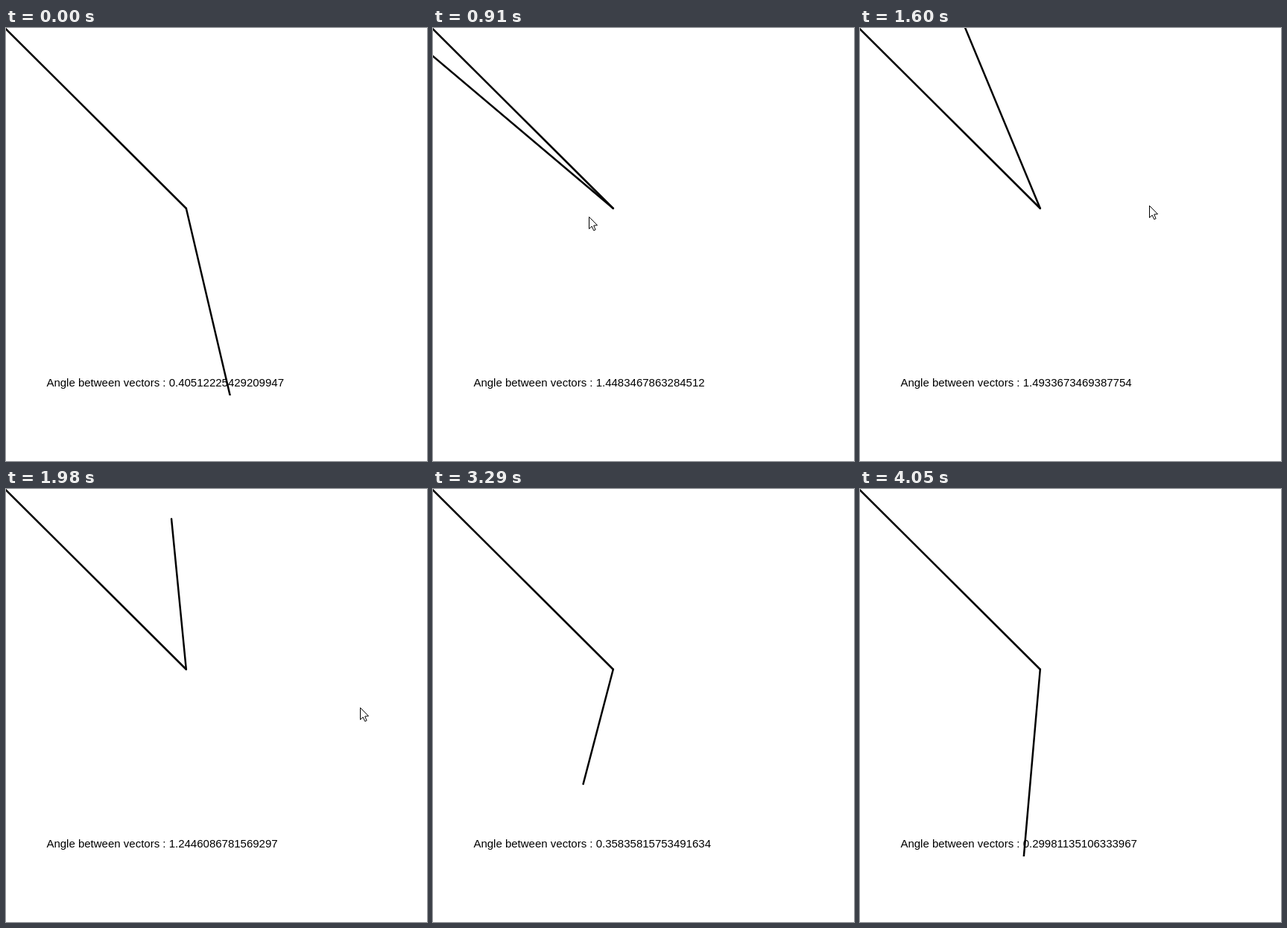
An HTML page with a canvas for the animation above (4830 ms loop, 565 by 581 pixels).

```html
<!DOCTYPE html>
<html lang="en">
<head>
<meta charset="utf-8">
<title>Angle between vectors</title>
<style>
  html, body { margin: 0; width: 100%; height: 100%; overflow: hidden; background: #fff; }
  canvas { display: block; }
</style>
</head>
<body>
<canvas id="stage" width="565" height="581"></canvas>
<script>
const ctx = document.getElementById("stage").getContext("2d");
const LOOP = 4830;
const STEP = 76;             // about 13 pictures per second
const ORIGIN = -8;           // sketch corner on the stage
const CENTER = 241.8;
const SKETCH_END = 493;
const POINTER_SHIFT = 244.5; // pointer position minus sketch position
const BASE_ANGLE = 1.4505;   // heading of the fixed vector

// The mouse vector in polar form: angle from the fixed vector, and length.
const at = (angle, length) => ({ angle, length });
const between = (a, b) => at((a.angle + b.angle) / 2, (a.length + b.length) / 2);

function move(from, to, start, end, middle = between(start, end)) {
  return { from, to, start, middle, end };
}

const moves = [
  move(0, 450, at(0.40512225429209947, 640), at(-0.256, 89), at(0.285, 390)),
  move(830, 910, at(-0.6, 52), at(-1.4483467863284512, 37)),
  move(980, 1290, at(4.325, 34), at(1.7563199851582543, 57.2), at(2.86, 22)),
  move(1370, 1910, at(1.712, 73.5), at(1.299, 218.5), at(1.463, 154)),
  move(1980, 2210, at(1.2446086781569297, 235), at(1.145, 269.5), at(1.183, 257)),
  move(2440, 2520, at(1.14, 295), at(1.1265166497378356, 324.5)),
  move(2600, 2910, at(1.063, 352), at(0.8465, 447), at(0.906, 415)),
  move(2980, 3290, at(0.77, 453), at(0.35835815753491634, 455), at(0.5015, 477)),
  move(3360, 3510, at(0.279, 435), at(0.121, 402)),
  move(3660, 4050, at(0.148, 415), at(0.29981135106333967, 557))
];

// Parabola through a at u = 0, m at u = 0.5 and b at u = 1.
const curve = (a, m, b, u) =>
  a * (2 * u - 1) * (u - 1) + m * 4 * u * (1 - u) + b * u * (2 * u - 1);

function mouseVector(t) {
  const { from, to, start, middle, end } = moves.findLast(m => m.from <= t);
  const count = Math.round((to - from) / STEP);
  const step = Math.floor((t - from + 5) / (to - from) * count);
  const u = Math.min(1, step / count);
  return at(
    curve(start.angle, middle.angle, end.angle, u),
    curve(start.length, middle.length, end.length, u)
  );
}

function drawLine(x, y) {
  ctx.beginPath();
  ctx.moveTo(CENTER, CENTER + 0.2);
  ctx.lineTo(x, y);
  ctx.stroke();
}

function drawPointer(x, y) {
  ctx.save();
  ctx.translate(Math.round(x) + 0.5, Math.round(y) + 0.5);
  ctx.fillStyle = "#fff";
  ctx.lineWidth = 1;
  const arrow = new Path2D("M0 0V16L3.7 12.6L6.2 18.2L8.6 17.2L6.2 11.6L11 11.2Z");
  ctx.fill(arrow);
  ctx.stroke(arrow);
  ctx.restore();
}

function draw(t) {
  const { angle, length } = mouseVector(t);
  const x = length * Math.cos(BASE_ANGLE - angle);
  const y = length * Math.sin(BASE_ANGLE - angle);
  const turn = Math.abs(angle);
  const label = Math.min(turn, 2 * Math.PI - turn);

  ctx.fillStyle = "#fff";
  ctx.fillRect(0, 0, 565, 581);
  ctx.strokeStyle = "#000";

  ctx.save();
  ctx.beginPath();
  ctx.rect(0, 0, 565, SKETCH_END);
  ctx.clip();
  ctx.lineWidth = 2.5;
  ctx.lineCap = "round";
  drawLine(ORIGIN, ORIGIN + 1.5);
  drawLine(x + ORIGIN, y + ORIGIN);
  ctx.fillStyle = "#000";
  ctx.font = "15px 'Liberation Sans', Arial, sans-serif";
  ctx.fillText("Angle between vectors : " + label, 54.4, 480.5);
  ctx.restore();

  drawPointer(x + POINTER_SHIFT, y + POINTER_SHIFT);
}

const start = performance.now();
function tick() {
  draw((performance.now() - start) % LOOP);
  requestAnimationFrame(tick);
}
tick();
</script>
</body>
</html>
```
